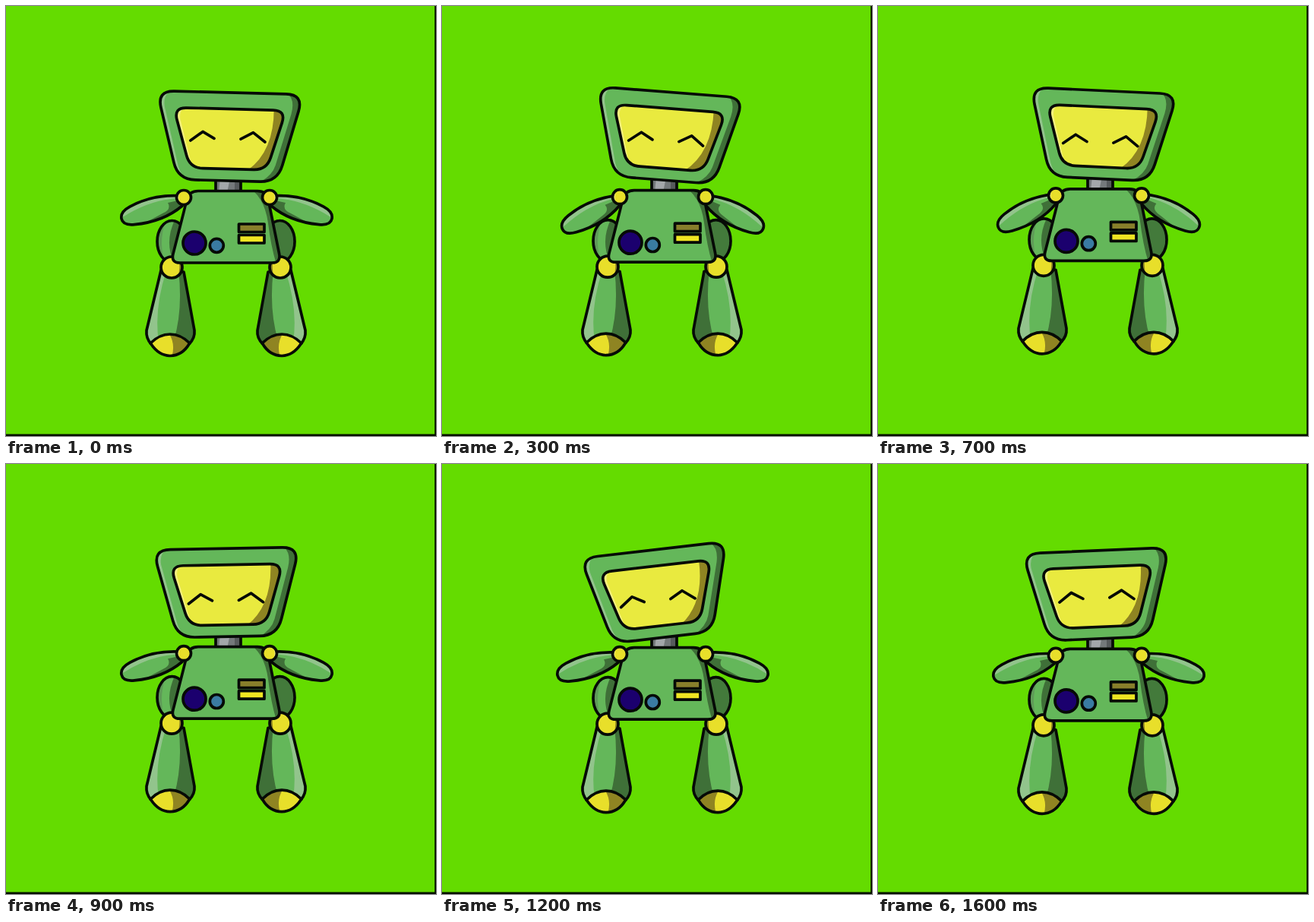
An HTML page that plays this animation: 566x566 px, repeating every 1700 ms.

```html
<!DOCTYPE html>
<html lang="en">
<head>
<meta charset="utf-8">
<title>Dancing robot</title>
<style>
  html, body { margin: 0; width: 100%; height: 100%; overflow: hidden; background: #64dc00; }
  svg { display: block; width: 100vw; height: 100vh; }
</style>
</head>
<body>
<svg id="stage" viewBox="0 0 566 566"></svg>
<script>
const LOOP = 1700, STEP = 100, LINE = 3.7;
const C = {
  green: '#64b75a', light: '#92c48c', dark: '#3f7038', ink: '#060a06',
  yellow: '#e9ea3f', gold: '#e8df2a', pale: '#f4f07c', olive: '#8f8422'
};
let clips = 0;

// Closed polygon with rounded corners.
function rounded(points, r) {
  const toward = (a, b) => {
    const k = r / Math.hypot(b[0] - a[0], b[1] - a[1]);
    return `${a[0] + (b[0] - a[0]) * k} ${a[1] + (b[1] - a[1]) * k}`;
  };
  const n = points.length;
  return points.map((p, i) => {
    const prev = points[(i + n - 1) % n], next = points[(i + 1) % n];
    return `${i ? 'L' : 'M'}${toward(p, prev)}Q${p[0]} ${p[1]} ${toward(p, next)}`;
  }).join('') + 'Z';
}

const oval = (x, y, rx, ry = rx) =>
  `M${x - rx} ${y}a${rx} ${ry} 0 1 0 ${2 * rx} 0a${rx} ${ry} 0 1 0 ${-2 * rx} 0Z`;

const line = d =>
  `<path d="${d}" fill="none" stroke="${C.ink}" stroke-width="${LINE}" stroke-linecap="round" stroke-linejoin="round"/>`;

// Outlined shape with shading patches clipped inside it.
function part(d, fill, shades = []) {
  const id = 'c' + clips++;
  const inner = shades.map(([color, s]) => `<path d="${s}" fill="${color}"/>`).join('');
  return `<clipPath id="${id}"><path d="${d}"/></clipPath><path d="${d}" fill="${fill}"/>` +
    `<g clip-path="url(#${id})">${inner}</g>${line(d)}`;
}

const mirror = (sum, content) => `<g transform="translate(${sum} 0) scale(-1 1)">${content}</g>`;

const leg = part(
  'M204 348L185 427Q184 437 191 445Q201 460 216 460.5Q232 460 241 445Q249 437 248 427L234 350Z',
  C.green, [
    [C.light, 'M180 340H214Q194 395 201 442L180 450Z'],
    [C.dark, 'M226 340Q234 396 221 440L252 450V340Z'],
    [C.gold, 'M190 444Q202 432 216 432Q230 432 242 444L236 466H196Z'],
    [C.olive, 'M215 432Q234 432 243 444L236 466H217Q224 446 215 432Z']
  ]) + line('M190 444Q202 432 216 432Q230 432 242 444');

const knee = part(oval(218, 344, 14), C.gold, [
  [C.olive, 'M226 328Q231 344 225 362H236V328Z']
]);

const arm = part(
  'M232 250Q194 247 163 264Q150 271 152 280Q154 289 169 287.5Q207 284 232 263Z',
  C.green, [
    [C.light, 'M232 247Q194 244 154 270L153 278Q192 253 232 253Z'],
    [C.dark, 'M236 254L213 259Q218 268 206 273Q190 282 172 290H236Z']
  ]);

const shoulder = part(oval(234, 252, 9.5), C.gold, [
  [C.pale, 'M222 240H230Q225 252 230 264H222Z']
]);

const thigh = shades => part(oval(218.5, 310, 19.5, 27.5), C.green, shades);
const softThigh = thigh([
  ['#5f9b58', 'M196 280H211Q200 310 209 340H196Z'],
  [C.dark, 'M224 278Q207 310 222 340H240V278Z']
]);
const deepThigh = thigh([
  ['#437a3b', 'M196 280H240V340H196Z'],
  [C.green, 'M196 296L203 290Q198 310 204 330H196Z']
]);

const limb = `<g class="arm">${arm}</g>`;

const neck = part('M276 226H309V246H276Z', '#74797b', [
  ['#a3a7aa', 'M282 226H295L291 246H280Z'],
  ['#565a5c', 'M301 226H310V246H301Z']
]);

const torso = part(rounded([[241, 243.5], [343, 243.5], [362, 338], [217, 338]], 12), C.green, [
  [C.light, 'M238 240H249Q240 256 236 270L226 296Z'],
  [C.dark, 'M324 242Q341 256 345 286Q349 318 356 340H366V242Z']
]);

const panel =
  part(oval(248, 312, 15), '#1b006e') +
  part(oval(277.3, 315.3, 9), '#3a7ba2') +
  part('M306.5 287H340V297.5H306.5Z', '#887f2b') +
  part('M306.5 301.5H340V312H306.5Z', '#efe522');

const head = part(rounded([[195.5, 114], [388.5, 114], [357, 230], [226, 230]], 23), C.green, [
  [C.light, 'M194 110H220Q203 116 206 134L226 212Q229 222 238 232H218Z'],
  [C.dark, 'M366 112Q378 120 373 140L354 208Q350 222 332 232H362L392 112Z']
]);

const screen = part(rounded([[218, 135.5], [366, 135.5], [342.5, 214.5], [241.5, 214.5]], 17), C.yellow, [
  [C.pale, 'M216 132H236Q225 138 227 150L242 204L240 216Z'],
  [C.olive, 'M350 132Q352 190 317 216H346L370 134Z']
]);

const eyes = line('M241.3 178.3L257.2 166.3L272.4 174.8M307.4 174.8L323.6 165.8L339.4 177.8');

const stage = document.getElementById('stage');
stage.innerHTML = `
  <rect width="566" height="566" fill="#64dc00"/>
  <g id="body">
    ${softThigh + leg + knee}${mirror(579, deepThigh + leg + knee)}
    ${limb}${mirror(581, limb)}
    ${neck}${torso}${panel}
    ${shoulder}${mirror(581, shoulder)}
    <g id="head">${head}${screen}<g id="eyes">${eyes}</g></g>
  </g>
  <path d="M564.2 0H566V566H0V563.5H564.2Z" fill="#061000"/>`;

const el = id => document.getElementById(id);
const body = el('body'), headGroup = el('head'), eyeGroup = el('eyes');
const arms = stage.querySelectorAll('.arm');

// [time, tilt in degrees]: slow swing right, quicker swing left, slow return.
const TILT = [[0, 1.5], [500, 6.4], [1200, -6.6], [1700, -1.4]];

function tiltAt(t) {
  const i = TILT.findIndex(([end]) => end > t);
  const [t0, a] = TILT[i - 1], [t1, b] = TILT[i];
  return a + (b - a) * (t - t0) / (t1 - t0);
}

function pose(t) {
  const bob = -1.4 * (1 - Math.cos(2 * Math.PI * t / LOOP));
  const eyeDrop = 4.8 * Math.sin(Math.PI * t / 1800);
  const flap = 5.3 - 7.3 * Math.cos(2 * Math.PI * (t - 50) / 400);
  body.setAttribute('transform', `translate(0 ${bob})`);
  headGroup.setAttribute('transform', `rotate(${tiltAt(t)} 292 236)`);
  eyeGroup.setAttribute('transform', `translate(0 ${eyeDrop - bob})`);
  arms.forEach(a => a.setAttribute('transform', `rotate(${-flap} 233 252)`));
}

function tick() {
  const t = performance.now() % LOOP;
  pose(Math.floor(t / STEP) * STEP);
  requestAnimationFrame(tick);
}
tick();
</script>
</body>
</html>
```
